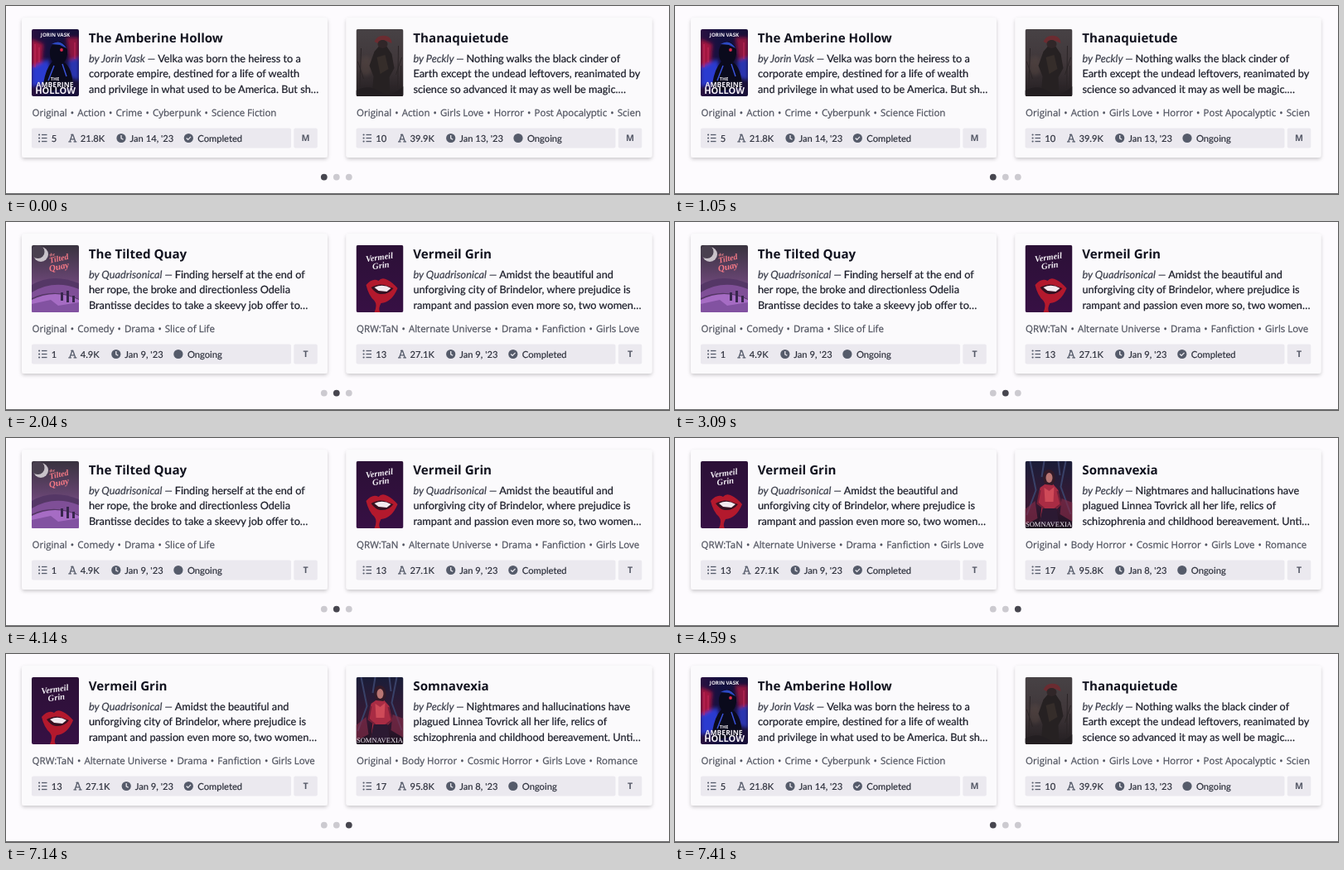
An HTML page for the animation above (7440 ms loop, 800 px wide and 227 px high).

```html
<!DOCTYPE html>
<html lang="en">
<head>
<meta charset="utf-8">
<title>Story carousel</title>
<style>
  html, body { margin: 0; width: 100%; height: 100%; overflow: hidden; background: #fdfbfe; }
  svg { display: block; width: 800px; height: 227px; text-rendering: geometricPrecision; }
  .title { font: 700 15.15px "Open Sans", "Noto Sans", sans-serif; fill: #12131f; }
  .blurb { font: 400 12.73px Lato, sans-serif; fill: #1b1d29; stroke: #1b1d29; stroke-width: .22; }
  .by { font-style: italic; fill: #3c3f4c; stroke: #3c3f4c; }
  .tags { font: 400 11.5px "Open Sans", "Noto Sans", sans-serif; fill: #50535f; stroke: #50535f; stroke-width: .25; }
  .stat { font: 400 11.2px Lato, sans-serif; fill: #2b2e3a; stroke: #2b2e3a; stroke-width: .18; }
  .rating { font: 700 10.6px "Open Sans", "Noto Sans", sans-serif; fill: #555967; text-anchor: middle; }
  .bar { fill: #ebe9ef; }
  .icon { fill: #555b6a; }
  .line { fill: none; stroke: #555b6a; stroke-width: 1.3; }
  .mark { fill: none; stroke: #ebe9ef; stroke-width: 1.3; }
  .cover text { text-anchor: middle; fill: #f4f0f6; }
  .sans { font-family: "Open Sans", sans-serif; font-weight: 700; }
  .script { font-family: "Liberation Serif", serif; font-style: italic; font-weight: 700; }
  .roman { font-family: "Liberation Serif", serif; }
</style>
</head>
<body>
<svg viewBox="0 0 800 227" xmlns="http://www.w3.org/2000/svg">
  <defs>
    <clipPath id="viewport"><rect x="13" y="0" width="773" height="200"/></clipPath>
    <clipPath id="coverClip"><rect width="57" height="81" rx="2"/></clipPath>
    <clipPath id="tagClip"><rect x="31" y="118" width="343.5" height="22"/></clipPath>
    <filter id="shadow" x="-5%" y="-10%" width="110%" height="125%">
      <feDropShadow dx="0" dy="2" stdDeviation="2" flood-color="#000" flood-opacity=".2"/>
    </filter>
    <filter id="soft" x="-40%" y="-40%" width="180%" height="180%"><feGaussianBlur stdDeviation="2.2"/></filter>
    <linearGradient id="neon"><stop stop-color="#2a1040"/><stop offset=".45" stop-color="#12103f"/><stop offset="1" stop-color="#1a1038"/></linearGradient>
    <linearGradient id="ash" x2="0" y2="1"><stop stop-color="#474245"/><stop offset=".5" stop-color="#40373a"/><stop offset="1" stop-color="#231e21"/></linearGradient>
    <linearGradient id="dusk" x2="0" y2="1"><stop stop-color="#39333f"/><stop offset=".5" stop-color="#65446f"/><stop offset="1" stop-color="#a26ac0"/></linearGradient>
    <linearGradient id="plum" x2="0" y2="1"><stop stop-color="#2b1036"/><stop offset="1" stop-color="#371044"/></linearGradient>
    <linearGradient id="gloom" x2="0" y2="1"><stop stop-color="#1a1d38"/><stop offset=".6" stop-color="#371a35"/><stop offset="1" stop-color="#1d1120"/></linearGradient>
  </defs>
  <g clip-path="url(#viewport)"><g id="strip"></g></g>
  <g id="dots"></g>
  <rect y="226" width="800" height="1" fill="#666568"/>
</svg>
<script>
const LOOP = 7440, PITCH = 391.5, SLIDE = 240;
const PAGES = [0, 2, 3];
const TURNS = [1170, 4170, 7155];

const label = (x, y, size, cls, text, extra = "") =>
  `<text x="${x}" y="${y}" font-size="${size}" class="${cls}" ${extra}>${text}</text>`;

const covers = {
  neon: `<rect width="57" height="81" fill="url(#neon)"/>
    <g filter="url(#soft)"><path d="M0 12L14 18 12 42 0 48Z" fill="#a3143f"/>
      <path d="M42 10H57V34L46 40Z" fill="#8d1740"/><path d="M44 38L57 34V62L46 58Z" fill="#2a35b0"/>
      <path d="M0 46L20 36 26 62 0 70Z" fill="#2a3ad0"/></g>
    <path d="M14 66Q17 47 25 39 21 34 22 25 25 14 34 15 44 18 43 30 42 37 39 40 49 46 50 70L14 76Z" fill="#0a0a1c"/>
    <path d="M24 18Q35 11 42 23L34 19Z" fill="#2d49c4"/><circle cx="36" cy="25" r="1.9" fill="#e02a4c"/>
    <path d="M27 44L20 62M37 42L42 57" stroke="#3c55e0" stroke-width="1.4"/>
    <path d="M4 18V46M9 22V40M52 16V36" stroke="#d03062" stroke-width=".8"/>`
    + label(28.5, 8.6, 6.2, "sans", "JORIN VASK")
    + label(28, 62, 5.5, "sans", "THE") + label(28, 69.5, 8.6, "sans", "AMBERINE")
    + label(28.5, 77.5, 11, "sans", "HOLLOW"),

  ash: `<rect width="57" height="81" fill="url(#ash)"/>
    <ellipse cx="12" cy="44" rx="8" ry="12" fill="#5c4b45" opacity=".4" filter="url(#soft)"/>
    <path d="M4 81L6 23M9 60L2 39M50 81L51 20M48 55L55 34M54 75V44" stroke="#2a2426" fill="none"/>
    <path d="M19 81L21 57 16 44 22 27 28 20 37 21 43 30 46 47 40 58 41 81Z" fill="#262122"/>
    <path d="M25 34L35 31 39 48 29 54Z" fill="#352d2a"/>
    <path d="M22 15Q26 6 36 8 43 10 43 17L36 14 28 18Z" fill="#6b2c31"/>
    <ellipse cx="32" cy="18" rx="6" ry="5" fill="#302628"/>
    <path d="M0 74Q15 66 28 75T57 69V81H0Z" fill="#231e21"/>`,

  dusk: `<rect width="57" height="81" fill="url(#dusk)"/>
    <circle cx="11" cy="11" r="9" fill="#c8c2c9"/><circle cx="7.5" cy="8" r="8" fill="#49404f"/>
    <path d="M0 48Q25 33 57 46V81H0Z" fill="#553766"/>
    <path d="M0 57Q27 41 57 53V65Q27 51 0 64Z" fill="#7f4f97"/>
    <path d="M0 66Q28 52 57 66V81H0Z" fill="#a66cc4"/>
    <path d="M0 71L23 66 32 73 57 69V81H0Z" fill="#8252a1"/>
    <path d="M35 67V57H38V67M42 69V55H45V69M49 69V61H52V69" fill="#38264d"/>
    <g transform="rotate(-12 30 22)">`
    + label(27, 12, 5, "script", "the", 'style="fill:#ff8a90"')
    + label(34, 20, 10, "script", "Tilted", 'style="fill:#f77a86"')
    + label(32, 30, 11, "script", "Quay", 'style="fill:#f77a86"') + `</g>`,

  plum: `<rect width="57" height="81" fill="url(#plum)"/>
    <g transform="rotate(-8 28 19)">`
    + label(28.5, 18, 10.5, "script", "Vermeil") + label(29, 28, 10.5, "script", "Grin") + `</g>
    <path d="M12 48Q20 39 27 43 31 38 38 42 44 45 50 52 43 69 30 70 26 77 29 81H22Q26 72 22 67 15 61 12 48Z" fill="#b3192d"/>
    <path d="M18 51Q27 46 34 48L45 52Q39 60 29 59 23 58 18 51Z" fill="#351021"/>
    <path d="M22 51Q32 46 42 52L37 56 27 55Z" fill="#f3e9ef"/>`,

  gloom: `<rect width="57" height="81" fill="url(#gloom)"/>
    <path d="M6 0L13 35 2 65M49 0L43 31 55 64M23 0L20 19M40 0L42 17" stroke="#394168" fill="none" stroke-width="2"/>
    <path d="M0 58L12 48 15 69 0 77M57 50L44 45 42 64 57 73Z" fill="#842c49" opacity=".65"/>
    <path d="M18 73L20 54 15 49 18 32 25 27H33L40 35 43 53 37 59 40 73Z" fill="#a92c44"/>
    <path d="M23 32L29 36 35 31 34 49 24 49Z" fill="#cf4a58"/>
    <path d="M18 35L15 51 23 57M39 36L43 52 35 58" stroke="#742039" fill="none" stroke-width="2"/>
    <path d="M22 22Q21 10 29 10 37 11 36 24L33 29 24 28Z" fill="#331b29"/>
    <ellipse cx="29" cy="20" rx="4" ry="6" fill="#b97673"/>
    <path d="M21 57H38L41 76H17Z" fill="#2b1932"/>`
    + label(28.5, 79, 8.5, "roman", "SOMNAVEXIA")
};

const cards = [
  { cover: "neon", title: "The Amberine Hollow", by: "Jorin Vask",
    blurb: ["Velka was born the heiress to a", "corporate empire, destined for a life of wealth", "and privilege in what used to be America. But sh…"],
    tags: "Original,Action,Crime,Cyberpunk,Science Fiction",
    chapters: "5", words: "21.8K", date: "Jan 14, '23", done: true, rating: "M" },
  { cover: "ash", title: "Thanaquietude", by: "Peckly",
    blurb: ["Nothing walks the black cinder of", "Earth except the undead leftovers, reanimated by", "science so advanced it may as well be magic.…"],
    tags: "Original,Action,Girls Love,Horror,Post Apocalyptic,Science Fiction",
    chapters: "10", words: "39.9K", date: "Jan 13, '23", done: false, rating: "M" },
  { cover: "dusk", title: "The Tilted Quay", by: "Quadrisonical",
    blurb: ["Finding herself at the end of", "her rope, the broke and directionless Odelia", "Brantisse decides to take a skeevy job offer to…"],
    tags: "Original,Comedy,Drama,Slice of Life",
    chapters: "1", words: "4.9K", date: "Jan 9, '23", done: false, rating: "T" },
  { cover: "plum", title: "Vermeil Grin", by: "Quadrisonical",
    blurb: ["Amidst the beautiful and", "unforgiving city of Brindelor, where prejudice is", "rampant and passion even more so, two women…"],
    tags: "QRW:TaN,Alternate Universe,Drama,Fanfiction,Girls Love",
    chapters: "13", words: "27.1K", date: "Jan 9, '23", done: true, rating: "T" },
  { cover: "gloom", title: "Somnavexia", by: "Peckly",
    blurb: ["Nightmares and hallucinations have", "plagued Linnea Tovrick all her life, relics of", "schizophrenia and childhood bereavement. Unti…"],
    tags: "Original,Body Horror,Cosmic Horror,Girls Love,Romance",
    chapters: "17", words: "95.8K", date: "Jan 8, '23", done: false, rating: "T" }
];

const at = (x, body) => `<g transform="translate(${x} 159.5)">${body}</g>`;
const disc = '<circle r="5.6" class="icon"/>';
const listIcon = [-4, 0, 4].map(y =>
  `<circle cx="1.1" cy="${y}" r="1.1" class="icon"/><path d="M4 ${y}H10.5" class="line"/>`).join("");
const fontIcon = '<path d="M-3.4 4.3L-.5-4H.5L3.4 4.3M-2.2 1.4H2.2" class="line"/><path d="M-5 4.3H-1.4M1.3 4.3H5M-2-4.2H.6" class="line"/>';
const clockIcon = disc + '<path d="M0-3.4V.3L2.5 1.8" class="mark"/>';
const checkIcon = disc + '<path d="M-2.6 0L-.7 1.9 2.7-1.6" class="mark"/>';

function stats(card) {
  const digit = 6.2;
  const fontX = 74.1 + digit * card.chapters.length;
  const wordsX = fontX + 9.4;
  const clockX = wordsX + 18.3 + digit * card.words.length;
  const dateX = clockX + 10.5;
  const stateX = dateX + 2.6 + digit * card.date.length;
  const stat = (x, s) => `<text x="${x}" y="163.5" class="stat">${s}</text>`;
  return `<rect x="31" y="147.5" width="313" height="24" rx="2" class="bar"/>
    <rect x="347.3" y="147.5" width="28.5" height="24" rx="2" class="bar"/>`
    + at(39, listIcon) + stat(54.7, card.chapters)
    + at(fontX, fontIcon) + stat(wordsX, card.words)
    + at(clockX, clockIcon) + stat(dateX, card.date)
    + at(stateX, card.done ? checkIcon : disc) + stat(stateX + 11, card.done ? "Completed" : "Ongoing")
    + `<text x="361.5" y="163.4" class="rating">${card.rating}</text>`;
}

function drawCard(card, i) {
  const lines = card.blurb.map((s, n) => {
    const by = n ? "" : `<tspan class="by">by ${card.by} — </tspan>`;
    return `<text x="100" y="${67.5 + 18.9 * n}" class="blurb">${by}${s}</text>`;
  }).join("");
  const tags = card.tags.split(",").join('<tspan dx="1.1"> •</tspan><tspan dx="1.1"> </tspan>');
  return `<g transform="translate(${i * PITCH} 0)">
    <rect x="19" y="14" width="369" height="169" rx="3.5" fill="#fbfafc" filter="url(#shadow)"/>
    <g transform="translate(31 28)"><g class="cover" clip-path="url(#coverClip)">${covers[card.cover]}</g></g>
    <text x="99.8" y="43.6" class="title">${card.title}</text>${lines}
    <g clip-path="url(#tagClip)"><text x="31.6" y="132.7" class="tags">${tags}</text></g>
    ${stats(card)}</g>`;
}

const strip = document.getElementById("strip");
const dots = document.getElementById("dots");
strip.innerHTML = cards.map(drawCard).join("");
dots.innerHTML = PAGES.map((_, i) => `<circle cx="${383.8 + 15 * i}" cy="206.6" r="3.9"/>`).join("");

const ease = p => p < .5 ? 4 * p ** 3 : 1 - (2 - 2 * p) ** 3 / 2;

function render(now) {
  const t = now % LOOP;
  let page = 0, offset = PAGES[0];
  TURNS.forEach((start, i) => {
    if (t < start) return;
    page = (i + 1) % PAGES.length;
    const p = Math.min(1, (t - start) / SLIDE);
    offset = PAGES[i] + (PAGES[page] - PAGES[i]) * ease(p);
  });
  strip.setAttribute("transform", `translate(${-offset * PITCH} 0)`);
  [...dots.children].forEach((dot, i) => dot.setAttribute("fill", i === page ? "#47464f" : "#cccad0"));
}

function tick() {
  render(performance.now());
  requestAnimationFrame(tick);
}
tick();
</script>
</body>
</html>
```
